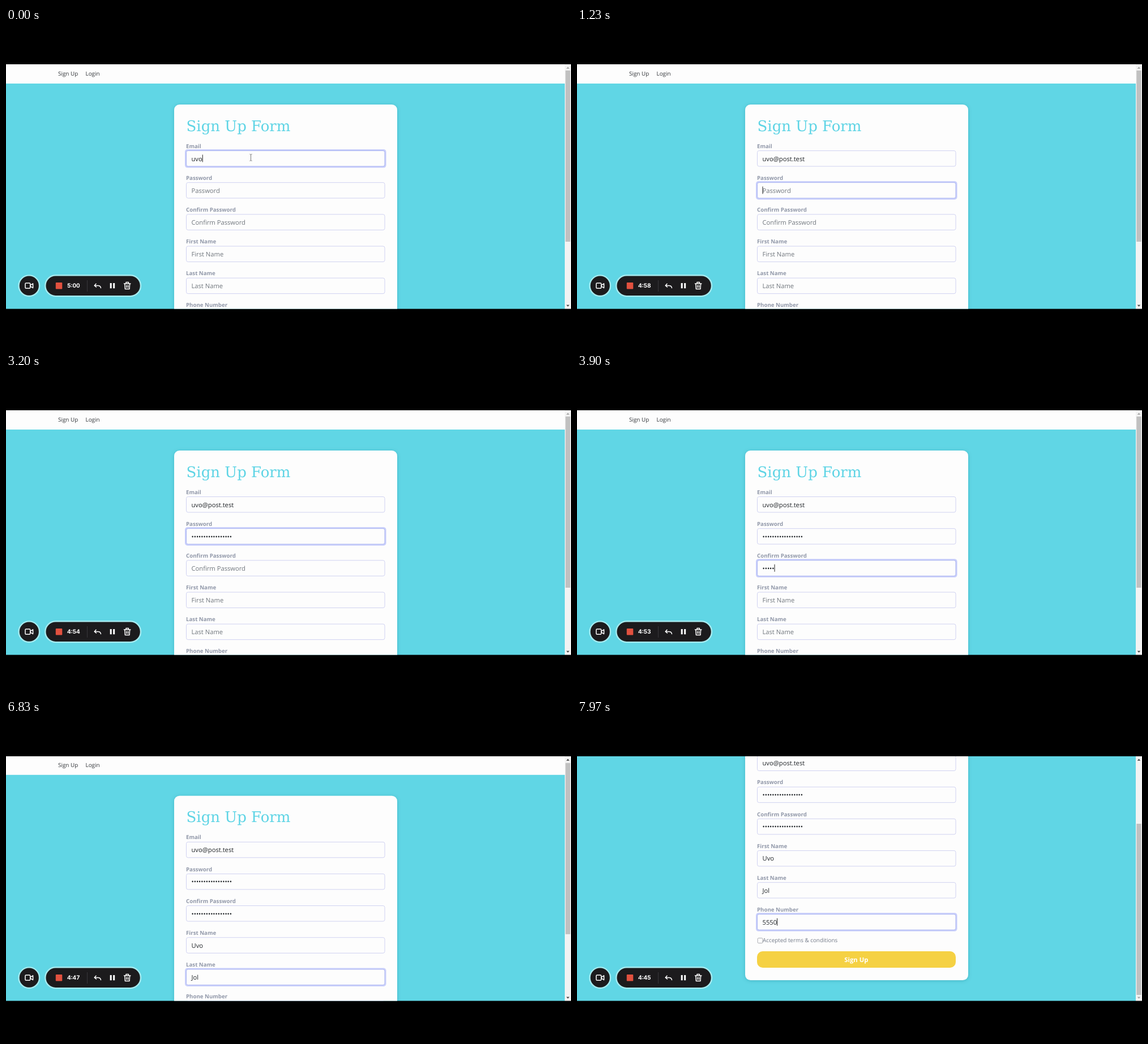
These frames come from a looping animation (998 by 561 pixels, 8000 ms). An HTML page:

```html
<!DOCTYPE html>
<html lang="en">
<head>
<meta charset="utf-8">
<title>Sign Up Form</title>
<style>
  html, body { margin: 0; width: 100%; height: 100%; overflow: hidden; background: #000; }
  svg { display: block; width: 100%; height: 100%; }
  text { font-family: "Open Sans", "Noto Sans", sans-serif; text-rendering: geometricPrecision; white-space: pre; }
  .nav { font-size: 9.9px; fill: #33363a; }
  .title { font: 26px "DejaVu Serif", serif; fill: #5dd4e5; }
  .label { font-size: 9.7px; font-weight: 700; fill: #9198a9; }
  .value { font-size: 11.2px; fill: #212529; }
  .value.empty { fill: #70767d; }
  .box { fill: #fdfdfd; stroke: #d0d2f1; }
  .ring rect:first-child { fill: #c8cefb; }
  .ring rect:last-child { fill: #fdfdfd; stroke: #aab4f1; }
  .terms { font-size: 9.9px; fill: #737a88; }
  .button { font-size: 11.3px; font-weight: 700; fill: #fff; text-anchor: middle; }
  .clock { font: 700 10.3px Inter, sans-serif; font-variant-numeric: tabular-nums; fill: #fff; }
  .dark { fill: #1c1b1d; stroke: #a5ebf0; stroke-width: 2.4; }
  .icon { fill: none; stroke: #fff; stroke-width: 1.5; stroke-linecap: round; stroke-linejoin: round; }
</style>
</head>
<body>
<svg viewBox="0 0 998 561" preserveAspectRatio="none">
  <defs>
    <clipPath id="view"><rect y="64" width="998" height="431.5"/></clipPath>
    <filter id="shadow" x="-10%" y="-10%" width="120%" height="120%">
      <feDropShadow dx="0" dy="1" stdDeviation="3" flood-color="#186a78" flood-opacity=".3"/>
    </filter>
  </defs>
  <rect width="998" height="561"/>
  <g clip-path="url(#view)">
    <rect y="64" width="987" height="432" fill="#60d6e5"/>
    <g id="page">
      <rect y="64" width="987" height="34" fill="#fdfdfd"/>
      <text class="nav" x="92" y="84.3">Sign Up</text>
      <text class="nav" x="140.5" y="84.3">Login</text>
      <rect x="297" y="135" width="394" height="478.5" rx="9.5" fill="#fdfdfd" filter="url(#shadow)"/>
      <text class="title" x="318.5" y="181.5">Sign Up Form</text>
      <g id="fields"></g>
      <rect x="319.2" y="539.3" width="8.8" height="8.8" rx="1.5" fill="#fff" stroke="#92959b" stroke-width=".8"/>
      <text class="terms" x="328" y="546.6">Accepted terms &amp; conditions</text>
      <rect x="318" y="562.5" width="351" height="29" rx="10" fill="#f5d143"/>
      <text class="button" x="493.3" y="581.4">Sign Up</text>
      <rect id="caret" width="1" height="13" fill="#222"/>
    </g>
    <path id="pointer" d="M430.5 222.5q2 0 2 1.5v9q0 1.500-2 1.500M434.500 222.500q-2 0-2 1.500v9q0 1.500 2 1.500" fill="none" stroke="#777" stroke-width=".9"/>
    <rect x="987" y="64" width="11" height="432" fill="#f3f3f3"/>
    <rect id="thumb" x="988.3" y="75" width="8.4" height="302" fill="#c0c0c0"/>
    <path id="up" d="M989.700 71.800h5.600l-2.800-3.200z"/>
    <path id="down" d="M989.700 488.400h5.600l-2.800 3.200z"/>
    <circle class="dark" cx="40.800" cy="454.700" r="18.300"/>
    <rect class="dark" x="69.300" y="436.300" width="168.700" height="36.800" rx="18.400"/>
    <g class="icon">
      <rect x="34" y="450" width="8.800" height="9.300" rx="1.500"/>
      <path d="M43 453.800l4.600-3v7.800l-4.600-3"/>
      <path d="M159 451.200l-2.800 3.200 3.200 2.600M156.600 454.400h6q4.400 0 4.900 4.200"/>
      <path d="M208.500 451h11.400M212 450.800v-2.200h4.400v2.200M209.800 451.500l.6 9h7.600l.6-9M212.800 454v3.800M215.600 454v3.800"/>
    </g>
    <path d="M183.700 450h3v9.300h-3zM189.200 450h3v9.300h-3z" fill="#fff"/>
    <path d="M143.500 445v20" stroke="#37363a"/>
    <rect x="87.800" y="449" width="11.500" height="11.500" rx="1" fill="#e2513f"/>
    <text class="clock" id="clock" x="108" y="458.300"></text>
  </g>
</svg>
<script>
const LOOP = 8000, FIELD_GAP = 56.15, SCROLL = 154.5, BLINK = 250, FADE = 75;
const byId = id => document.getElementById(id);
const clamp = v => Math.min(1, Math.max(0, v));

// focus: time of focus; first/step: key press times; typed: characters already present
const secret = '•'.repeat(17);
const fields = [
  { label: 'Email', text: 'uvo@post.test', focus: -500, first: 70, step: 90, typed: 3 },
  { label: 'Password', text: secret, focus: 1150, first: 1340, step: 90 },
  { label: 'Confirm Password', text: secret, focus: 3220, first: 3530, step: 87 },
  { label: 'First Name', text: 'Uvo', focus: 5150, first: 5650, step: 125 },
  { label: 'Last Name', text: 'Jol', focus: 6130, first: 6340, step: 105 },
  { label: 'Phone Number', text: '5550', focus: 6825, first: 7350, step: 175 }
];

function add(parent, tag, attrs, text = '') {
  const node = document.createElementNS('http://www.w3.org/2000/svg', tag);
  for (const key in attrs) node.setAttribute(key, attrs[key]);
  node.textContent = text;
  return parent.appendChild(node);
}

fields.forEach((field, i) => {
  const y = 216.5 + i * FIELD_GAP;
  const box = { x: 318.5, y, width: 350.5, height: 27.5, rx: 3 };
  const group = byId('fields');
  field.y = y;
  add(group, 'text', { class: 'label', x: 318, y: y - 4.8 }, field.label);
  add(group, 'rect', { class: 'box', ...box });
  field.ring = add(group, 'g', { class: 'ring' });
  add(field.ring, 'rect', { x: 316, y: y - 2.5, width: 355.5, height: 32.5, rx: 4.5 });
  add(field.ring, 'rect', box);
  field.value = add(group, 'text', { class: 'value', x: 327.5, y: y + 18 });
});

const easeInOut = p => p < .5 ? 2 * p * p : 1 - 2 * (1 - p) ** 2;

function drawField(field, next, t) {
  const { text, focus, first, step, typed = 0 } = field;
  const keys = Math.min(text.length - typed, Math.max(0, Math.floor((t - first) / step) + 1));
  const shown = text.slice(0, typed + keys);
  field.value.textContent = shown || field.label;
  field.value.classList.toggle('empty', !shown);
  const blurred = next ? clamp((t - next.focus) / FADE) : 0;
  field.ring.setAttribute('opacity', clamp((t - focus) / FADE) - blurred);

  if (t < focus || next && t >= next.focus) return;
  const lastInput = keys ? first + (keys - 1) * step : focus;
  const caret = byId('caret');
  caret.setAttribute('x', 327.5 + (shown ? field.value.getComputedTextLength() : 0));
  caret.setAttribute('y', field.y + 7);
  caret.setAttribute('opacity', Math.floor((t - lastInput) / BLINK) % 2 ? 0 : 1);
}

function render(t) {
  fields.forEach((field, i) => drawField(field, fields[i + 1], t));
  const progress = easeInOut(clamp((t - 6810) / 320));
  byId('page').setAttribute('transform', `translate(0 ${-SCROLL * progress})`);
  byId('thumb').setAttribute('y', 75 + 108 * progress);
  byId('up').setAttribute('fill', progress > 0 ? '#444' : '#a3a3a3');
  byId('down').setAttribute('fill', progress < 1 ? '#444' : '#a3a3a3');
  byId('pointer').setAttribute('opacity', t < 70 ? 1 : 0);

  const left = 300 - Math.max(0, Math.floor((t - 100) / 500));
  byId('clock').textContent = `${Math.floor(left / 60)}:${String(left % 60).padStart(2, '0')}`;
}

let start;
function tick(now) {
  start ??= now;
  render((now - start) % LOOP);
  requestAnimationFrame(tick);
}
render(0);
requestAnimationFrame(tick);
</script>
</body>
</html>
```
